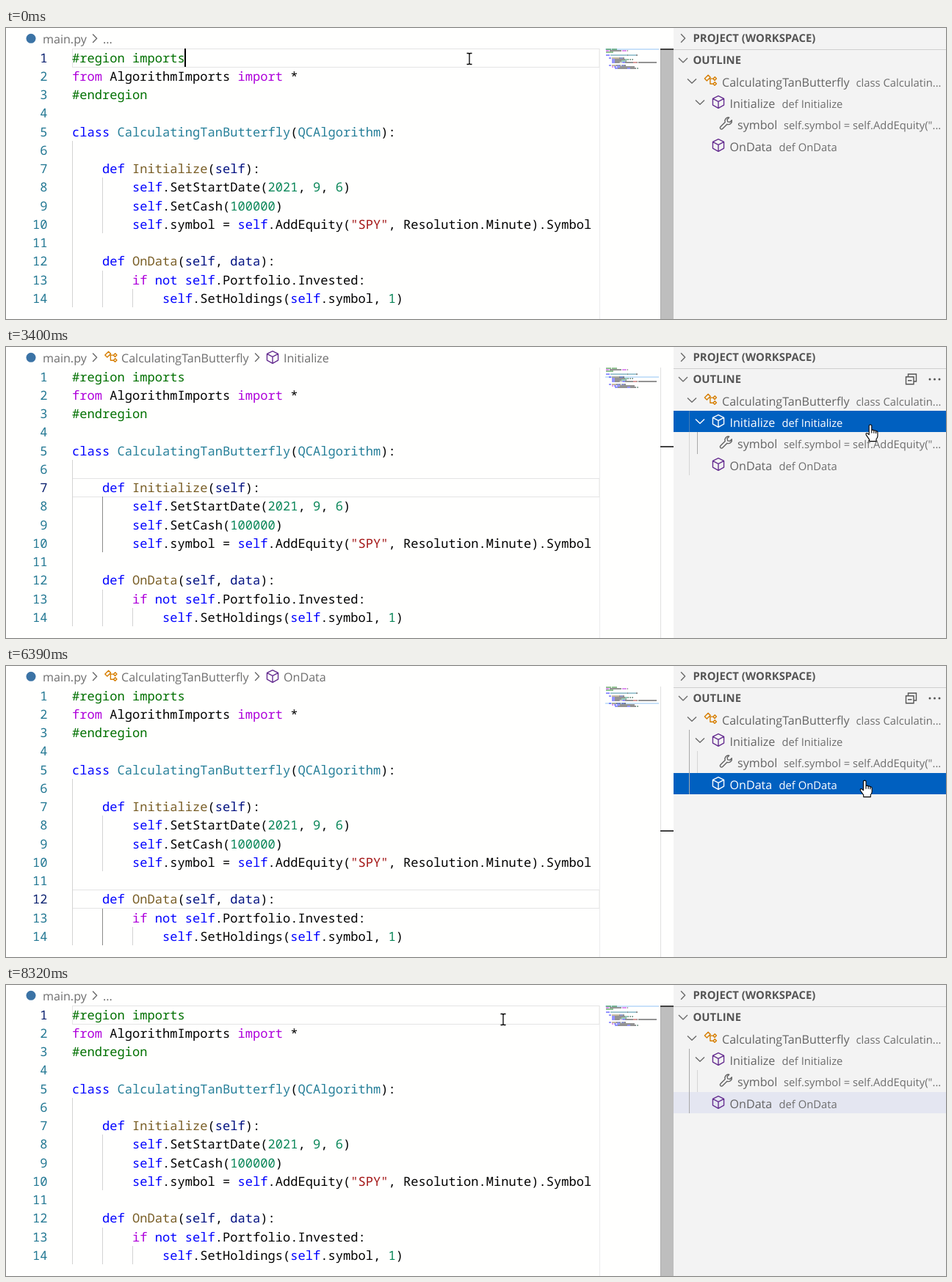
Recreate the animation shown at these times as an HTML page. Size 1280x397 px, loop 8390 ms.

```html
<!DOCTYPE html>
<html lang="en">
<head>
<meta charset="utf-8">
<title>Code outline</title>
<style>
html, body { margin: 0; width: 100%; height: 100%; overflow: hidden; background: #fffffe; }
svg { display: block; width: 1280px; height: 397px; }
text { white-space: pre; text-rendering: geometricPrecision; }
.code { font: 17.09px "Noto Sans Mono", monospace; }
.ui { font: 16.1px "Open Sans", sans-serif; }
.desc { font: 14.77px "Open Sans", sans-serif; }
.head { font: bold 14.9px "Open Sans", sans-serif; }
</style>
</head>
<body>
<svg id="stage" viewBox="0 0 1280 397"></svg>
<script>
const LOOP = 8390, PITCH = 25.25, CHAR = 10.254, ROW = 88 / 3, LEFT = 90, SIDE = 909;
const stage = document.getElementById('stage');

function el(tag, attrs, parent = stage) {
  const node = document.createElementNS('http://www.w3.org/2000/svg', tag);
  set(node, attrs);
  parent.appendChild(node);
  return node;
}
function set(node, attrs) {
  for (const key in attrs) node.setAttribute(key, attrs[key]);
}
const group = (parent = stage) => el('g', {}, parent);
const rect = (x, y, width, height, fill, parent) => el('rect', { x, y, width, height, fill }, parent);
function text(x, y, str, cls, fill, parent) {
  const node = el('text', { x, y, class: cls, fill }, parent);
  node.textContent = str;
  return node;
}
const show = (node, on) => node.setAttribute('opacity', +on);
const ramp = (t, a, b) => Math.min(1, Math.max(0, (t - a) / (b - a)));

// Icons, each on a 16 unit square
const SHAPES = {
  class: 'M1.2 5.5L5.2 1.5 7.7 4 3.7 8zM5.8 5.6H11M7.5 5.6V11.5H11M10.8 5.7l2-2 1.8 1.8-2 2zM10.8 11.5l2-2 1.8 1.8-2 2z',
  cube: 'M8 1L14.3 4.2V11.4L8 15 1.7 11.4V4.2zM1.7 4.2L8 7.5 14.3 4.2M8 7.5V15',
  wrench: 'M14.5 4.5a4 4 0 0 1-5.3 4.6L4 14.3a1.6 1.6 0 0 1-2.3-2.3L6.9 6.8A4 4 0 0 1 11.5 1.5L9.3 3.7l.5 2.5 2.5.5z',
  right: 'M5.6 3.2L10.2 8 5.6 12.8',
  down: 'M3 5.6L8 10.4 13 5.6'
};
const TINT = { class: '#d67e00', cube: '#652d90', wrench: '#616161', right: '#6a6a6a', down: '#6a6a6a' };
function icon(name, x, y, parent) {
  return el('path', {
    d: SHAPES[name], fill: 'none', stroke: TINT[name], 'stroke-width': 1.15, 'stroke-linejoin': 'round',
    transform: `translate(${x} ${y}) scale(1.2) translate(-8 -8)`
  }, parent);
}

// Code: "~" starts a token, the next letter is its colour
const INK = { g: '#007000', p: '#af00db', b: '#0000ff', t: '#267f99', f: '#795e26',
              v: '#001080', n: '#098658', s: '#a31515', k: '#000000' };
const CODE = [
  [0, '~g#region imports'],
  [0, '~pfrom~k AlgorithmImports ~pimport~k *'],
  [0, '~g#endregion'],
  [0, ''],
  [0, '~bclass ~tCalculatingTanButterfly~k(~tQCAlgorithm~k):'],
  [0, ''],
  [4, '~bdef ~fInitialize~k(~vself~k):'],
  [8, '~bself~k.SetStartDate(~n2021~k, ~n9~k, ~n6~k)'],
  [8, '~bself~k.SetCash(~n100000~k)'],
  [8, '~bself~k.symbol = ~bself~k.AddEquity(~s"SPY"~k, Resolution.Minute).Symbol'],
  [0, ''],
  [4, '~bdef ~fOnData~k(~vself~k, ~vdata~k):'],
  [8, '~pif ~bnot self~k.Portfolio.Invested:'],
  [12, '~bself~k.SetHoldings(~bself~k.symbol, ~n1~k)']
];
const lineTop = n => Math.floor(28 + (n - 1) * PITCH);

// Editor
const lineBox = el('rect', { x: LEFT + .5, width: 717.5, height: 25, fill: 'none', stroke: '#e4e4e4' });
rect(60, 20, 30, 377, '#fffffe');
rect(808, 28, 1, 369, '#ececec');

const mapLine = el('rect', { x: 816, width: 73, height: 2, fill: '#c8e1f9' });
const GUIDES = [[0, 6, 14], [4, 8, 10], [4, 13, 14], [8, 14, 14]].map(([col, from, to]) =>
  rect(Math.round(LEFT + col * CHAR), lineTop(from), 1, lineTop(to + 1) - lineTop(from), '#d3d3d3'));
const ACTIVE = { 5: 0, 7: 1, 10: 1, 12: 2 };

const numbers = CODE.map(([indent, source], i) => {
  const base = lineTop(i + 1) + 19;
  const line = text(LEFT + indent * CHAR, base, '', 'code', '#000');
  let col = indent;
  for (const token of source.split('~').slice(1)) {
    const fill = INK[token[0]], str = token.slice(1);
    el('tspan', { fill }, line).textContent = str;
    for (const word of str.matchAll(/\S+/g))
      set(rect(817 + col + word.index, 28.4 + i * 2, word[0].length, 1.3, fill), { opacity: .65 });
    col += str.length;
  }
  const num = text(56.6, base, i + 1, 'code', '#237893');
  set(num, { 'text-anchor': 'end' });
  return num;
});
const caret = rect(243, 28, 2, 25, '#000');

const slider = rect(808, 28, 82, 64, '#646464');
rect(891, 28, 1, 369, '#e0e0e0');
const bar = rect(891, 28, SIDE - 891, 369, '#646464');
const mark = el('rect', { x: 891, width: SIDE - 891, height: 2, fill: '#424242' });

// Breadcrumbs
const GREY = '#6e6e6e';
const crumbText = (x, str, parent) => text(x, 20.6, str, 'ui', GREY, parent);
el('circle', { cx: 34, cy: 14.3, r: 6.5, fill: '#3b73a5' });
crumbText(50, 'main.py');
icon('right', 121, 14.3);
const dots = crumbText(132, '...');
const crumb = group();
icon('class', 143, 14, crumb);
crumbText(157, 'CalculatingTanButterfly', crumb);
function subCrumb(x, name, label) {
  const g = group(crumb);
  icon('right', x, 14.3, g);
  icon(name, x + 21, 14, g);
  crumbText(x + 36, label, g);
  return g;
}
const initCrumb = subCrumb(342, 'cube', 'Initialize');
const symbolCrumb = subCrumb(452, 'wrench', 'symbol');
const dataCrumb = subCrumb(342, 'cube', 'OnData');

// Side bar
const sideRect = (y, height, fill) => rect(SIDE, y, 1280 - SIDE, height, fill);
sideRect(0, 397, '#f3f3f3');
sideRect(29, 1, '#cfcfcf');
icon('right', 922, 14);
text(935.5, 19.2, 'PROJECT (WORKSPACE)', 'head', '#555');
icon('down', 922, 44);
text(935.5, 49.2, 'OUTLINE', 'head', '#555');
const tools = group();
el('path', {
  d: 'M1228.5 40.5V37H1239.5V47H1236M1225.5 40.8H1236V50.8H1225.5zM1228 45.8H1233.5',
  fill: 'none', stroke: '#555', 'stroke-width': 1.4
}, tools);
for (const x of [1258, 1264.5, 1271]) el('circle', { cx: x, cy: 44, r: 1.5, fill: '#555' }, tools);

const rowTop = i => Math.floor(58 + i * ROW + .01);
const hoverRow = sideRect(0, 29, '#f0f0f0');
const pickRow = sideRect(0, 29, '#0060c0');
const TREE = [
  ['class', 959.5, 'CalculatingTanButterfly', 975, 'class Calculatin...', 1157.5, 934],
  ['cube', 970, 'Initialize', 985.5, 'def Initialize', 1056.5, 945],
  ['wrench', 980.5, 'symbol', 996, 'self.symbol = self.AddEquity("...', 1059],
  ['cube', 970, 'OnData', 985.5, 'def OnData', 1052.5]
];
const rows = TREE.map(([name, ix, label, lx, desc, dx, chevron], i) => {
  const top = rowTop(i);
  return {
    name,
    icon: icon(name, ix, top + 14),
    label: text(lx, top + 22, label, 'ui', ''),
    desc: text(dx, top + 22, desc, 'desc', ''),
    chevron: chevron && icon('down', chevron, top + 14.3)
  };
});
const treeGuides = group();
const treeGuide = (x, from, to) => rect(x, rowTop(from), 1, rowTop(to) - rowTop(from), '#a9a9a9', treeGuides);
const outer = treeGuide(930, 1, 4);
const inner = treeGuide(941, 2, 3);

// Mouse pointers, drawn around their hot spot
const beam = el('path', { d: 'M-3.5 -7.5H-1L0 -6.5 1 -7.5H3.5M0 -6.5V6.5M-3.5 7.5H-1L0 6.5 1 7.5H3.5', fill: 'none', stroke: '#000', 'stroke-width': 1.3 });
const arrow = el('path', { d: 'M0 0V17L4 13.3 6.6 19.2 9.2 18 6.7 12.3H12z', fill: '#fff', stroke: '#000' });
const hand = el('path', {
  d: 'M-1.8 1.5Q0 -.6 1.8 1.5V8Q3.6 6.8 4.9 8.5 6.6 7.6 7.6 9.3 9.8 8.8 9.9 11V16Q9.7 18.5 8 20V23H-1.5V20.5L-5.6 14.6Q-6.8 11.6-4.2 12L-1.8 14zM1.8 8V12M4.9 8.5V12.2M7.6 9.3V12.5',
  fill: '#fff', stroke: '#000', 'stroke-width': 1.1, 'stroke-linejoin': 'round'
});

// time, x, y
const PATH = [
  [0, 631, 42], [80, 631, 42], [180, 710, 44], [300, 850, 50], [420, 945, 57], [650, 1080, 68],
  [910, 1155, 76], [1360, 1179, 79], [2170, 1179, 79], [2360, 1176, 100], [3290, 1176, 100],
  [3400, 1177, 105.5], [3640, 1179, 126.5], [4920, 1179, 126.5], [5260, 1170, 156], [6390, 1170, 156],
  [6500, 1090, 120], [6620, 930, 72], [6720, 845, 45], [6830, 800, 35], [7220, 744, 38],
  [7650, 677, 47], [LOOP, 677, 47]
];
function mouseAt(t) {
  const i = Math.max(1, PATH.findIndex(p => p[0] > t));
  const [t0, x0, y0] = PATH[i - 1], [t1, x1, y1] = PATH[i];
  const k = ramp(t, t0, t1);
  return [x0 + (x1 - x0) * k, y0 + (y1 - y0) * k];
}

const CLICKS = [1530, 2820, 4150, 5600], LINES = [1, 5, 7, 10, 12], BACK = 7750, LAG = 60;
const passed = t => CLICKS.filter(c => t >= c).length;

function draw(t) {
  const picked = passed(t) - 1;
  const inEditor = t >= BACK;
  const place = inEditor ? 0 : passed(t - LAG);
  const line = LINES[place];

  set(lineBox, { y: lineTop(line) + .5 });
  set(mapLine, { y: 28 + (line - 1) * 2 });
  set(mark, { y: Math.round(28 + (line - 1) * 17.85) });
  numbers.forEach((n, i) => set(n, { fill: i + 1 === line ? '#0b216f' : '#237893' }));
  GUIDES.forEach((g, i) => set(g, { fill: ACTIVE[line] === i ? '#8a8a8a' : '#d3d3d3' }));
  show(caret, t < 500 || (t >= 1000 && t < CLICKS[0]) || (inEditor && t < BACK + 500));

  show(bar, .42 * (1 - ramp(t, 330, 900) + ramp(t, 6630, 6730)));
  show(slider, .22 * (ramp(t, 270, 340) - ramp(t, 390, 800) + ramp(t, 6660, 6740) - ramp(t, 6840, 7500)));

  show(dots, place === 0);
  show(crumb, place > 0);
  show(initCrumb, place === 2 || place === 3);
  show(symbolCrumb, place === 3);
  show(dataCrumb, place === 4);

  const [x, y] = mouseAt(t);
  const over = Math.floor((y - rowTop(0)) / ROW);
  show(hoverRow, x > SIDE && over >= 0 && over < 4);
  set(hoverRow, { y: rowTop(over) });
  show(pickRow, picked >= 0);
  const top = rowTop(Math.max(0, picked));
  set(pickRow, { y: top, height: rowTop(picked + 1) - top, fill: inEditor ? '#e4e6f1' : '#0060c0' });
  rows.forEach((r, i) => {
    const lit = i === picked && !inEditor;
    set(r.icon, { stroke: lit ? '#fff' : TINT[r.name] });
    set(r.label, { fill: lit ? '#fff' : '#646464' });
    set(r.desc, { fill: lit ? '#fff' : GREY });
    if (r.chevron) set(r.chevron, { stroke: lit ? '#fff' : TINT.down });
  });
  show(tools, t >= 410 && !inEditor);
  show(treeGuides, ramp(t, 930, 1030));
  show(outer, picked === 0 || picked === 3 ? 1 : .4);
  show(inner, picked === 1 || picked === 2 ? 1 : .4);

  const kind = x < 808 ? beam : x < SIDE ? arrow : hand;
  for (const p of [beam, arrow, hand]) show(p, p === kind);
  set(kind, { transform: `translate(${x} ${y})` });
}

const start = performance.now();
function frame() {
  draw((performance.now() - start) % LOOP);
  requestAnimationFrame(frame);
}
frame();
</script>
</body>
</html>
```
